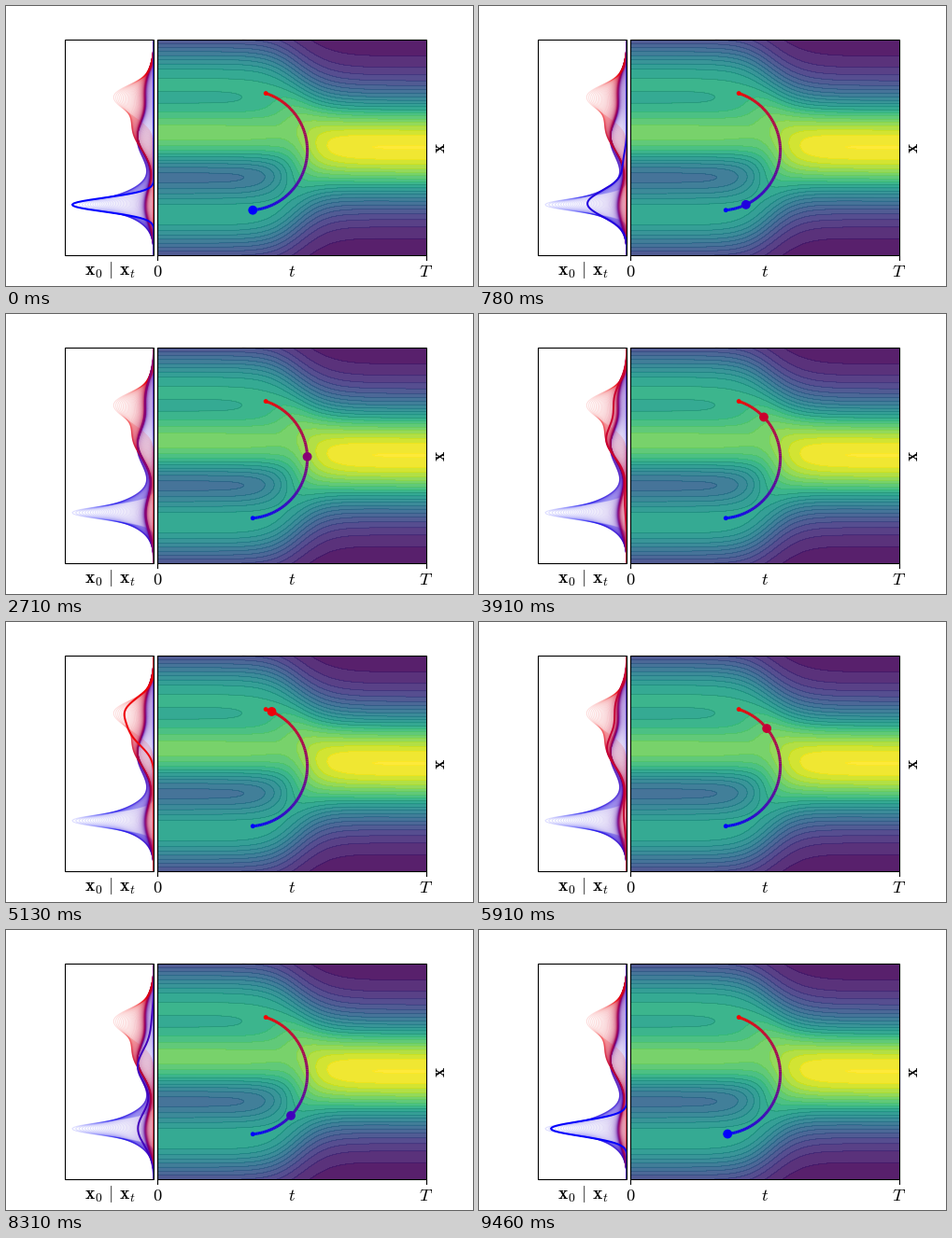
Recreate the animation shown at these times as a matplotlib script. Size 500x300 px, loop 9520 ms.

```python
import numpy as np
import matplotlib.pyplot as plt
from matplotlib.animation import FuncAnimation
from matplotlib.collections import LineCollection
from matplotlib.patches import Circle, Rectangle

plt.rcParams["mathtext.fontset"] = "cm"

W, H, DPI = 500, 300, 100
LOOP, STEP = 9520, 34
PX = 72 / DPI                     # one pixel in points
TOP, BOTTOM = 36, 267
MID = (TOP + BOTTOM) / 2
SIDE = (62.5, 158.4)              # density panel
MAIN = (162.4, 450)               # space-time panel
UNIT_MAIN = (BOTTOM - TOP) / 8    # x in [-4, 4]
UNIT_SIDE = (BOTTOM - TOP) / 9    # x in [-4.5, 4.5]

# Data distribution: a mixture of three Gaussians
MEANS, WEIGHTS, SIGMA = (-2.5, 0.5, 2.5), (0.275, 0.45, 0.275), 0.75

# Path: a circular arc, angles in degrees below the horizontal
CENTER, RADIUS = (258.3, 154.7), 64.3
START, SWEEP = 84.7, 156.7


def mixture(x, alpha=1.0, noise=0.0):
    """Density of alpha * data + Gaussian noise of the given variance."""
    var = (alpha * SIGMA) ** 2 + noise
    return sum(w * np.exp(-(x - alpha * m) ** 2 / (2 * var)) / np.sqrt(2 * np.pi * var)
               for m, w in zip(MEANS, WEIGHTS))


def point(p):
    ang = np.radians(START - SWEEP * p)
    return CENTER[0] + RADIUS * np.cos(ang), CENTER[1] + RADIUS * np.sin(ang)


def tint(p, alpha=1.0):
    return (0.97 * p, 0.0, 1 - p, alpha)


xs = np.linspace(-4.5, 4.5, 180)
prior = mixture(xs)


def posterior(p):
    """Density of the clean value given the noisy point at p."""
    px, py = point(p)
    spread = np.exp(-1.15 + 0.044 * (px - point(0)[0]))
    center = 1.02 * (MID - py) / UNIT_MAIN
    dens = prior * np.exp(-0.5 * ((xs - center) / spread) ** 2)
    return dens / dens.sum()


SCALE = 87.5 / posterior(0).max()


def curve(p):
    return np.column_stack([SIDE[1] - SCALE * posterior(p), MID - UNIT_SIDE * xs])


def progress(ms):
    """Hold, go along the arc, hold, come back."""
    return float(np.interp(ms, [180, 4760, 4940, LOOP], [0, 1, 1, 0]))


fig = plt.figure(figsize=(W / DPI, H / DPI), dpi=DPI, facecolor="white")
ax = fig.add_axes([0, 0, 1, 1])
ax.set_xlim(0, W)
ax.set_ylim(H, 0)
ax.axis("off")


def draw_field():
    gx, gy = np.meshgrid(np.linspace(*MAIN, 160), np.linspace(TOP, BOTTOM, 180))
    log_snr = 10 - 20 * (gx - MAIN[0]) / (MAIN[1] - MAIN[0])
    signal = 1 / (1 + np.exp(-log_snr))
    dens = mixture((MID - gy) / UNIT_MAIN, np.sqrt(signal), 1 - signal)
    field = (dens * np.sqrt(2 * np.pi)) ** 0.53
    levels = 0.998 + 0.05 * np.arange(-20, 2)
    ax.contourf(gx, gy, field, levels, cmap="viridis", vmin=0, vmax=1,
                alpha=0.9, zorder=1)
    ax.contour(gx, gy, field, levels[levels < 0.62], colors="#2c1a5c",
               linewidths=0.5 * PX, alpha=0.25, zorder=2)


def draw_ghosts(clip):
    ps = np.linspace(0, 1, 151)
    ghosts = LineCollection([curve(p) for p in ps], colors=[tint(p, 0.14) for p in ps],
                            linewidths=PX, zorder=3)
    ax.add_collection(ghosts, autolim=False)
    ghosts.set_clip_path(clip)


def draw_path():
    pts = np.column_stack(point(np.linspace(0, 1, 101)))
    segs = np.stack([pts[:-1], pts[1:]], axis=1)
    ax.add_collection(LineCollection(segs, colors=[tint(p) for p in np.linspace(0, 1, 100)],
                                     linewidths=3 * PX, zorder=4), autolim=False)
    for p in (0, 1):
        ax.add_patch(Circle(point(p), 2.4, color=tint(p), lw=0, zorder=5))


def draw_frame(x0, x1):
    return ax.add_patch(Rectangle((x0, TOP), x1 - x0, BOTTOM - TOP, fill=False,
                                  ec="black", lw=0.8, zorder=8))


def label(x, y, text, size=18.5, **kw):
    ax.text(x, y, text, fontsize=size * PX, ha="center", **kw)


draw_field()
side = draw_frame(*SIDE)
draw_frame(*MAIN)
draw_ghosts(side)
draw_path()
for x in MAIN:
    ax.plot([x, x], [BOTTOM, BOTTOM + 4.9], color="black", lw=0.8, zorder=8)
label(111.5, 288, r"$\mathbf{x}_0\,\mid\,\mathbf{x}_t$", size=19.5, va="baseline")
label(162.5, 290, "$0$", va="baseline")
label(306, 290, "$t$", va="baseline")
label(450, 290, "$T$", va="baseline")
label(464, 151.5, r"$\mathbf{x}$", size=19.5, va="center", rotation=90)

line, = ax.plot([], [], lw=2 * PX, zorder=6)
line.set_clip_path(side)
dot = ax.add_patch(Circle(point(0), 4.9, lw=0, zorder=7))


def update(i):
    p = progress((i + 0.5) * STEP)
    line.set_data(*curve(p).T)
    line.set_color(tint(p))
    dot.center = point(p)
    dot.set_facecolor(tint(p))
    return line, dot


anim = FuncAnimation(fig, update, frames=LOOP // STEP, interval=STEP,
                     repeat=True, repeat_delay=0)
plt.show()
```
